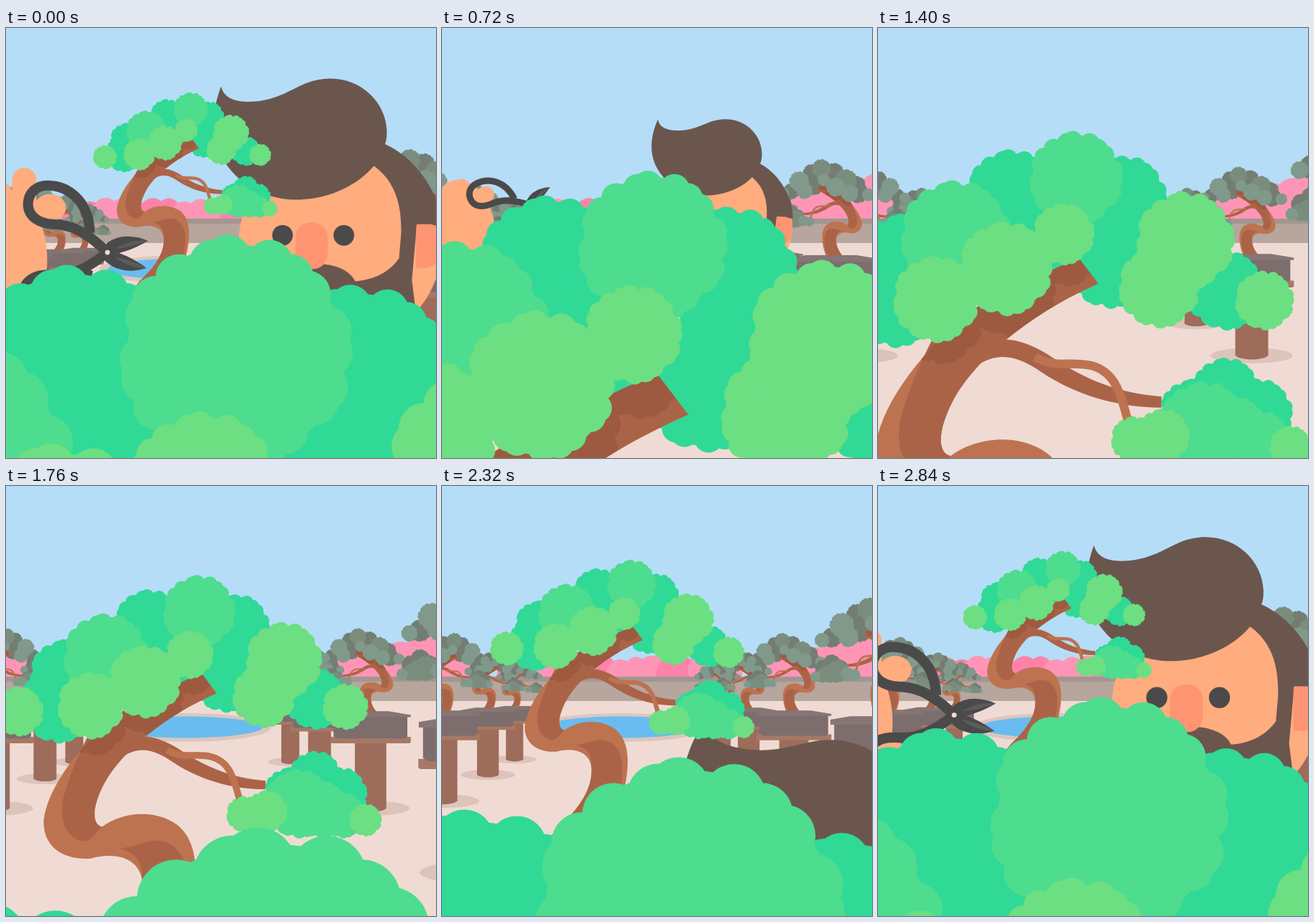
These frames come from a looping animation (600 by 600 pixels, 2.88 s). An HTML page with a canvas:

```html
<!DOCTYPE html>
<html lang="en">
<head>
<meta charset="utf-8">
<title>Bonsai garden</title>
<style>
html, body { margin: 0; width: 100%; height: 100%; overflow: hidden; background: #b5ddf7; }
canvas { display: block; width: 100vw; height: 100vh; }
</style>
</head>
<body>
<canvas id="stage" width="600" height="600"></canvas>
<script>
const ctx = document.getElementById('stage').getContext('2d');
const LOOP = 2880, STEP = 40, VX = 246, HORIZON = 298, TAU = Math.PI * 2;
const DARK = '#4a4a4a', HAIR = '#6b564e', SKIN = '#ffac7e', BLUSH = '#ff9472';
const BARK = { dark: '#ab6348', light: '#bd7350', shade: '#9d5a41' };
const FRESH = { back: '#30d996', mid: '#4edc8e', front: '#6bdf82' };
const MUTED = { back: '#737d74', mid: '#7a8d7d', front: '#80998a' };

const rad = deg => deg * Math.PI / 180;
const series = (n, make) => Array.from({ length: n }, (_, i) => make(i));
function ramp(t, from, to) {
  const p = Math.min(1, Math.max(0, (t - from) / (to - from)));
  return p * p * (3 - 2 * p);
}
function bell(t, mid, width) {
  return Math.exp(-(((t - mid) / width) ** 2));
}

// The camera backs away: each centre tree shrinks and rises with its age t.
function zoom(t) {
  const r = 8 + 428.5 / (1 + Math.exp(.00093 * (t + 600)));
  return { r, x: 247 + .445 * r, y: 60 + 2.2 * r + .0012 * r * r };
}

// The gardener pops up leaning in, settles, glances aside and ducks.
function pose(t) {
  const up = ramp(t, -640, -400);
  return {
    up,
    lean: 1 - ramp(t, -360, -60),
    glance: ramp(t, 0, 360),
    hide: 1 - up + ramp(t, 600, 880),
    thrust: ramp(t, -50, 10),
    blink: bell(t, -360, 60),
    snip: 13 - 7 * Math.cos(TAU * (t + 360) / 720)
  };
}

const puff = new Path2D();
puff.arc(0, 0, .92, 0, TAU);
for (let i = 0; i < 20; i++) {
  const a = i * TAU / 20 + .08 * Math.sin(i * 2.4), d = .8 + .015 * Math.sin(i * 1.7);
  puff.moveTo(d * Math.cos(a) + .2, d * Math.sin(a));
  puff.arc(d * Math.cos(a), d * Math.sin(a), .2, 0, TAU);
}

// Tree parts sit around the top clump at (263, 146) with radius 38.
const dome = (x, y, rx, ry, r, taper, angles) => angles.map((a, i) =>
  [x - rx * Math.cos(rad(a)), y - ry * Math.sin(rad(a)), r - taper * i]);
const CROWN = {
  back: [
    ...dome(250, 243, 134, 88, 40, 2, [0, 20, 73, 113, 176]),
    ...series(2, i => [222 + 68 * i, 200 + 15 * i, 36])
  ],
  mid: [[166, 193, 45], [263, 146, 38]],
  front: [[75, 250, 26], [150, 244, 35], [206, 219, 38], [253, 191, 25], [330, 234, 33], [351, 197, 40], [415, 245, 24]]
};
const LOW = {
  back: dome(384, 336, 26, 17, 28, 0, [0, 90, 180]),
  mid: series(3, i => [366 + 23 * i, 346 + 6 * i, 36 - 6 * i]),
  front: [[310, 357, 19], [333, 354, 22], [436, 363, 17]]
};
const trunk = new Path2D('M281 231C230 253 183 290 164 325C150 352 152 368 162 370C180 356 215 350 240 368C265 388 262 430 252 470C240 510 225 540 200 570H110C118 560 148 528 150 523C180 495 205 465 204 430C203 405 180 395 150 403C120 405 101 390 101 365C104 330 140 280 190 245L265 210Z');
const trunkInner = new Path2D('M281 231C230 253 183 290 164 325C150 352 152 368 162 370C152 378 150 388 138 384C122 378 117 360 122 338C130 310 140 290 148 274L190 245L265 210ZM198 389C230 375 249 395 251 422C252 445 249 460 244 475L200 570H110C118 560 148 528 150 523C180 495 205 465 204 430C204 408 200 398 180 393Z');
const branch = new Path2D('M160 308C185 265 215 273 240 288C270 309 300 320 332 322V331C295 331 262 320 236 303C210 285 190 282 160 320Z');
const twig = new Path2D('M230 290C245 300 258 293 275 297C295 302 299 320 305 342');

function ellipse(x, y, rx, ry, color) {
  ctx.fillStyle = color;
  ctx.beginPath();
  ctx.ellipse(x, y, rx, ry, 0, 0, TAU);
  ctx.fill();
}
function rect(x, y, w, h, color, radius = 0) {
  ctx.fillStyle = color;
  ctx.beginPath();
  ctx.roundRect(x, y, w, h, radius);
  ctx.fill();
}
function shape(d, color) {
  ctx.fillStyle = color;
  ctx.fill(typeof d === 'string' ? new Path2D(d) : d);
}
function turned(x, y, degrees, paint) {
  ctx.save();
  ctx.translate(x, y);
  ctx.rotate(rad(degrees));
  ctx.translate(-x, -y);
  paint();
  ctx.restore();
}
function clump([x, y, r], color, fold = 0) {
  ctx.save();
  ctx.translate(x, y - Math.abs(x - 263) * fold);
  ctx.scale(r, r);
  shape(puff, color);
  ctx.restore();
}

function tree(x, y, r, colors, { flip = 1, tilt = 0, fold = 0 } = {}) {
  const layer = (group, name) => group[name].forEach(c => clump(c, colors[name], fold));
  const crown = paint => turned(263, 146, tilt * .75, paint);
  ctx.save();
  ctx.translate(x, y);
  ctx.scale(flip * r / 38, r / 38);
  ctx.rotate(rad(tilt * .25));
  ctx.translate(-263, -146);
  crown(() => layer(CROWN, 'back'));
  shape(branch, BARK.dark);
  ctx.strokeStyle = BARK.light;
  ctx.lineWidth = 7;
  ctx.stroke(twig);
  shape(trunk, BARK.light);
  shape(trunkInner, BARK.dark);
  ctx.save();
  ctx.clip(trunk);
  CROWN.front.slice(1, 4).forEach(([a, b, c]) => clump([a + 3, b + 17, c], BARK.shade));
  ctx.restore();
  for (const name in LOW) layer(LOW, name);
  crown(() => { layer(CROWN, 'mid'); layer(CROWN, 'front'); });
  ctx.restore();
}

function backdrop() {
  rect(0, 0, 600, 600, '#b5ddf7');
  for (let i = 0; i < 15; i++)
    ellipse(95 + i * 22, 259 + 3 * Math.sin(i * 2), 18 + 2 * Math.sin(i * 3), 20, i % 5 < 2 ? '#ff82a9' : '#ff95b6');
  for (const side of [-1, 1])
    for (let i = 0; i < 6; i++)
      ellipse(VX + side * (215 + i * 30), 262 - i * 4, 24 + i * 2, 21 + i * 4, '#ff95b6');
  rect(0, 266, 600, 34, '#b6a69d');
  rect(0, 266, 600, 7, '#a39690');
  rect(0, 300, 600, 300, '#efdbd3');
  ellipse(250, 337, 120, 20, '#dcc6be');
  ellipse(250, 336.5, 108, 15, '#69bcf0');
}

function potted(z, side) {
  ctx.save();
  ctx.translate(VX, HORIZON);
  ctx.scale(side / z, 1 / z);
  ellipse(707, 408, 147, 28, '#dcc4ba');
  rect(648, 150, 118, 258, '#9e6c5b');
  ellipse(707, 405, 59, 17, '#9e6c5b');
  tree(660, -237, 31, MUTED, { flip: -1 });
  shape('M557 140H858V158Q858 164 850 164H565Q557 164 557 158Z', '#a67866');
  shape('M568 60H845V140L832 146H580L568 138Z', '#7d6d6d');
  shape('M558 53L610 44H775L858 58V66H558Z', '#857575');
  ctx.restore();
}

function garden(u) {
  for (let k = u < .3 ? 4 : 3; k >= 0; k--)
    for (const side of [-1, 1]) potted(1.08 + u + k, side);
}

function man({ r, y }, { lean, glance, hide, blink }) {
  ctx.save();
  ctx.translate(VX + r * (1.1 + .19 * lean + .1 * glance), y + r * (1.8 * hide - .91 - .08 * lean - .075 * glance));
  ctx.scale(r / 164, r / 164);
  ctx.rotate(rad(2.2 * lean + 4 * glance));
  ctx.translate(-427, -302);

  ctx.save();
  ctx.translate(-20 * lean, 0);
  const tuck = 45 * (1 - lean);
  rect(304 + tuck, 279, 40, 61, BLUSH, 14);
  rect(318 + tuck, 277, 40, 110, HAIR);
  ellipse(467, 300, 142, 142, SKIN);
  shape('M505 150L531 161C576 182 607 232 609 275L574 272L567 350L572 390L548 440H470V352C515 354 538 336 549 320L552 285C553 245 544 210 510 188Z', HAIR);
  rect(573, 272, 35, 61, BLUSH, [4, 17, 24, 0]);
  ctx.restore();

  shape('M367 366C380 318 472 316 488 352C515 352 538 336 549 320L560 400L500 440H390Z', HAIR);
  rect(404.5, 269.5, 45, 65, BLUSH, 21);
  for (const x of [386.5, 472]) ellipse(x, 287.5, 14.4, 14.4 * (1 - .57 * blink), DARK);

  ctx.translate(-29 * lean, -11 * lean);
  turned(430, 200, 11 * lean - 2, () =>
    shape('M305 75C308 92 325 98 345 98C380 98 400 84 423 75C482 54 534 95 534 145Q534 156 531 163C522 201 470 237 410 237C346 237 293 190 293 132C293 110 298 92 305 75Z', HAIR));
  ctx.restore();
}

function shears({ r, y }, { lean, glance, hide, thrust, snip }) {
  const swing = -60 * lean - 26 * glance;
  ctx.save();
  ctx.translate(
    VX + r * (.06 * lean + .23 * thrust - .08 * glance - 1.2 * hide - .85),
    y + r * (1.5 * hide - .853 - .88 * lean - .283 * glance));
  ctx.scale(r / 164, r / 164);

  turned(0, 0, swing / 2, () => ellipse(-150, 10, 66, 100, SKIN));
  turned(0, 0, swing, () => {
    rect(-165, -98, 32, 110, SKIN, 16);
    rect(-133, -118, 34, 120, SKIN, 17);
  });

  ctx.rotate(rad(3 + swing));
  for (const side of [-1, 1]) {
    ctx.save();
    ctx.scale(1, side);
    ctx.rotate(rad(snip - 22));
    ellipse(-81, -61, 22, 19, SKIN);
    ctx.strokeStyle = DARK;
    ctx.lineWidth = 14;
    ctx.lineJoin = 'round';
    ctx.stroke(new Path2D('M-25 -27C-27 -72 -57 -92 -84 -92C-102 -92 -112 -80 -112 -66C-112 -48 -96 -39 -77 -38C-55 -38 -34 -32 0 0'));
    shape('M-6 -5Q26 0 55 21Q20 32 -2 13Z', DARK);
    shape('M10 6Q30 9 55 21Q30 22 10 6Z', '#5b5b5b');
    ctx.restore();
  }
  ellipse(0, 0, 3.4, 3.4, '#efdbd3');
  ctx.restore();
}

// Late in its life the tree is nudged by the gardener, then falls out of sight.
function centreTree(t) {
  const { r, x, y } = zoom(t), age = t - LOOP, { lean, up, glance } = pose(age);
  const push = lean * up, drop = 140 * (Math.max(0, age) / 360) ** 2;
  tree(x + 8 * push - 22 * glance, y + drop, r, FRESH, {
    tilt: 7 * push - 5 * glance,
    fold: .1 * bell(t, 100, 700)
  });
}

function draw(t) {
  const near = t > LOOP / 2 ? t - LOOP : t;
  backdrop();
  garden(t / LOOP);
  if (near > -640 && near < 880) {
    man(zoom(near), pose(near));
    shears(zoom(near), pose(near));
  }
  if (near < 520) centreTree(near + LOOP);
  centreTree(near);
}

const start = performance.now();
function tick() {
  const t = (performance.now() - start) % LOOP;
  draw(Math.floor(t / STEP) * STEP);
  requestAnimationFrame(tick);
}
draw(0);
requestAnimationFrame(tick);
</script>
</body>
</html>
```
